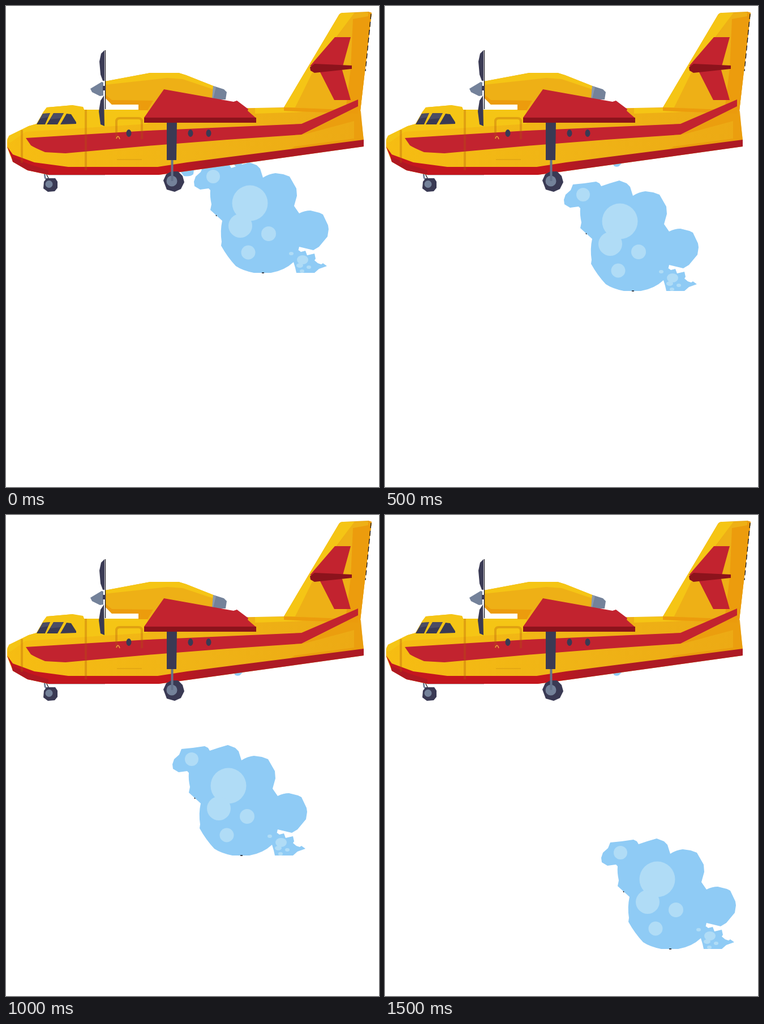
Recreate the animation shown at these times as an HTML page. Size 659 by 849 pixels, loop 2 s.

```html
<!DOCTYPE html>
<html lang="en">
<head>
<meta charset="utf-8">
<title>Water bomber</title>
<style>
  html, body { margin: 0; width: 100%; height: 100%; overflow: hidden; background: #fff; }
  svg { display: block; width: 659px; height: 849px; }
  .navy { fill: #3a3a54; }
  .grey { fill: #74829a; }
  .red { fill: #c2232f; }
  .maroon { fill: #8c131c; }
  .sun { fill: #f5c515; }
  .gold { fill: #eeb016; }
  .orange { fill: #ec9c0d; }
  .water { fill: #8fcbf5; }
  .foam { fill: #b0dcf6; }
  .seam { fill: none; stroke: #b0560c; stroke-opacity: .32; stroke-width: 4; }
  .edge { fill: none; stroke: #15131c; stroke-width: 1.3; }
</style>
</head>
<body>
<svg viewBox="0 0 659 849">
  <defs>
    <linearGradient id="skin" x1="0" y1="0" x2="1" y2="0">
      <stop offset="0" stop-color="#f6bd12"/>
      <stop offset=".5" stop-color="#f0b416"/>
      <stop offset="1" stop-color="#eca914"/>
    </linearGradient>
    <linearGradient id="keel" x1="0" y1="0" x2="1" y2="0">
      <stop offset=".44" stop-color="#c4161e"/>
      <stop offset=".56" stop-color="#ad1a24"/>
    </linearGradient>
  </defs>

  <path class="water" d="M403 278L419 277L413 283Q408 285 404 282Z"/>
  <path id="spray" class="water" d="M308 292L332 289L331 297Q325 302 314 300Z"/>

  <g id="cloud">
    <path class="water" d="M332 310L335 301L344 293L348 283L368 281L389 278L395 281L398 286L413 281L430 276L443 281L449 287L454 303Q465 296 476 295L490 297L501 301L513 322L514 335L509 353L518 366Q528 361 538 361L554 365L560 368L569 387L570 394L568 407L553 425L543 431L518 425L515 438L508 452Q492 467 468 471H438Q418 467 406 459Q391 443 380 423L381 416Q378 397 382 379L361 360L363 350Q360 336 361 325L358 322L343 324L333 318Z"/>
    <path class="water" d="M508 452L508 438L514 433L517 431L521 434L529 432L532 440L545 437L547 446L545 449L551 454L557 456L560 454L567 459L553 464L545 471H513L511 462Z"/>
    <g id="bubbles" class="foam"></g>
    <path class="edge" d="M452 471H456M371 369L372 371"/>
  </g>

  <g id="plane">
    <!-- nose gear -->
    <path d="M68 294L69 303L76 312" fill="none" stroke="#74829a" stroke-width="3"/>
    <path class="edge" d="M71 296L75 304M75 297.5H175"/>
    <path class="navy" d="M67 310L72 304L87 304L91 310V321L86 327L74 328L66 322Z"/>
    <circle class="grey" cx="76" cy="314.500" r="6.500"/>

    <!-- fuselage and fin -->
    <path fill="url(#skin)" d="M2 238Q2 231 10 227L40 212L54 208L66 187L72 179L118 175L122 178H136L138 183H250L440 180L491 179L588 16Q590 12 596 12L640 10L646 12L626 185L632 236V248L308 293L270 298H75L38 290L12 275L2 250Z"/>
    <path class="sun" d="M5 229L40 212L54 208L66 187L72 179L118 175L136 178L138 183H250V208L35 222L8 241L2 240Z"/>
    <path class="sun" d="M440 180H491V185L525 187L440 190Z"/>
    <path class="sun" d="M491 179L588 16Q590 12 596 12H616L603 29L578 62L546 112L511 179Z"/>
    <path class="gold" d="M616 12L603 29L540 120L511 179L626 185L640 62L646 12Z"/>
    <path class="orange" d="M613 23L640 18V10L646 12L626 185L600 184L609 110Z"/>
    <path class="orange" d="M491 179L622 184V190L491 185Z"/>
    <path class="orange" d="M522 228L622 177L627 186L632 240L490 261L510 248L615 234V203Z" opacity=".8"/>
    <path class="edge" d="M645 14L635 115" stroke-dasharray="9 5"/>

    <!-- belly and stripe -->
    <path fill="url(#keel)" d="M2 248L12 262L50 276L110 284H268L320 276L632 236V248L308 293L270 298H75L38 290L12 275L10 268Z"/>
    <path fill="#a51a25" d="M10 266L40 279L75 290V297L38 290L12 275Z" opacity=".65"/>
    <path class="red" d="M35 233L250 220L522 208L622 165V177L522 227L390 236L250 247L105 260L69 258Q50 250 44 246Z"/>
    <path class="seam" d="M28 219V277M141 183V290"/>
    <path class="seam" d="M195 235V204Q195 198 201 198H234Q240 198 240 204V235" stroke-width="3"/>
    <path d="M196 271H240" stroke="#d99a10" stroke-width="1"/>
    <path d="M195 234Q198 226 201 235" fill="none" stroke="#f0a53a" stroke-width="1.500"/>

    <!-- tailplane -->
    <path class="red" d="M581 55H609L595 106H537ZM553 113H594L609 166H580Z"/>
    <path class="maroon" d="M537 108L545 102L611 105V111L545 118L538 114Z"/>

    <!-- windows -->
    <path class="navy" d="M54 209L65 190L78 189L69 209ZM72 209L84 189H102L91 209ZM96 209L107 190L115 191L124 205V208Z"/>
    <path d="M65 190L78 189L75 196L60 199ZM84 189H102L97 198L78 200Z" fill="#575970" opacity=".6"/>
    <g id="ports" class="navy"></g>

    <!-- engine -->
    <path class="gold" d="M175 133L255 118H305L318 122L366 141V166L280 184H234V174H187L175 160Z"/>
    <path class="sun" d="M175 133L255 118H305L318 122L366 141V147L312 129L285 127L175 139Z"/>
    <path class="orange" d="M175 156L187 166L260 167L250 184H234V174H187L175 162Z"/>
    <path fill="#fff" d="M176 174H230Q234 175 234 179Q234 183 229 183H187Q181 180 176 174Z"/>
    <path class="grey" d="M366 141L385 147L390 152L388 165H366Z"/>
    <path fill="#8b98ac" d="M371 143L366 164H364L366 141Z"/>

    <!-- main gear -->
    <path class="navy" d="M278 308L283 297L292 292H304L312 300L315 311L309 323L298 328L284 324Z"/>
    <circle class="grey" cx="293" cy="309" r="9.500"/>
    <path d="M293.500 271V309" stroke="#65728b" stroke-width="4"/>
    <path class="navy" d="M284 204H302L301 272H284Z"/>

    <!-- wing -->
    <path class="red" d="M279 147L402 169L408 167L428 182L427 185L442 198V206H244V197Z"/>
    <path class="maroon" d="M244 197H442V206H244Z"/>

    <!-- propeller -->
    <path class="edge" d="M175.500 78V182" stroke-width="2"/>
    <path class="navy" d="M174 78L168 84L165 98L167 121L171 132H174ZM173 158L167 167L164 186L167 209L174 212Z"/>
    <path class="grey" d="M149 146L169 134L172 135V158L166 159L152 152Z"/>
    <path class="navy" d="M171 141H176V149H171Z"/>
  </g>
</svg>
<script>
  const LOOP = 2000;
  const $ = id => document.getElementById(id);

  function dots(group, list) {
    for (const [cx, cy, rx, ry = rx] of list) {
      const dot = document.createElementNS(group.namespaceURI, 'ellipse');
      Object.entries({ cx, cy, rx, ry }).forEach(([k, v]) => dot.setAttribute(k, v));
      group.append(dot);
    }
  }

  dots($('bubbles'), [
    [366, 301, 12], [431, 348, 31.5], [414, 388, 21], [464, 402, 13], [428, 435, 12.5],
    [524, 448, 10, 8], [519, 458, 6, 4], [535, 461, 4, 3], [523, 468, 4, 3], [504, 437, 4, 3]
  ]);
  dots($('ports'), [[217, 224.5, 4.5, 6.5], [326, 224.5, 4.5, 6.5], [358, 224.5, 4.5, 6.5]]);

  // Each step holds for an equal share of the loop.
  function play(el, steps) {
    const keys = steps.map((s, i) => ({ ...s, offset: i / steps.length, easing: 'step-end' }));
    keys.push({ ...steps[steps.length - 1], offset: 1 });
    el.animate(keys, { duration: LOOP, iterations: Infinity }).startTime = 0;
  }

  const drops = [[0, 0], [-16, 32], [-38, 130], [50, 295]];
  play($('cloud'), drops.map(([x, y]) => ({ transform: `translate(${x}px, ${y}px)` })));
  play($('spray'), [1, 0, 0, 0].map(opacity => ({ opacity })));
</script>
</body>
</html>
```
